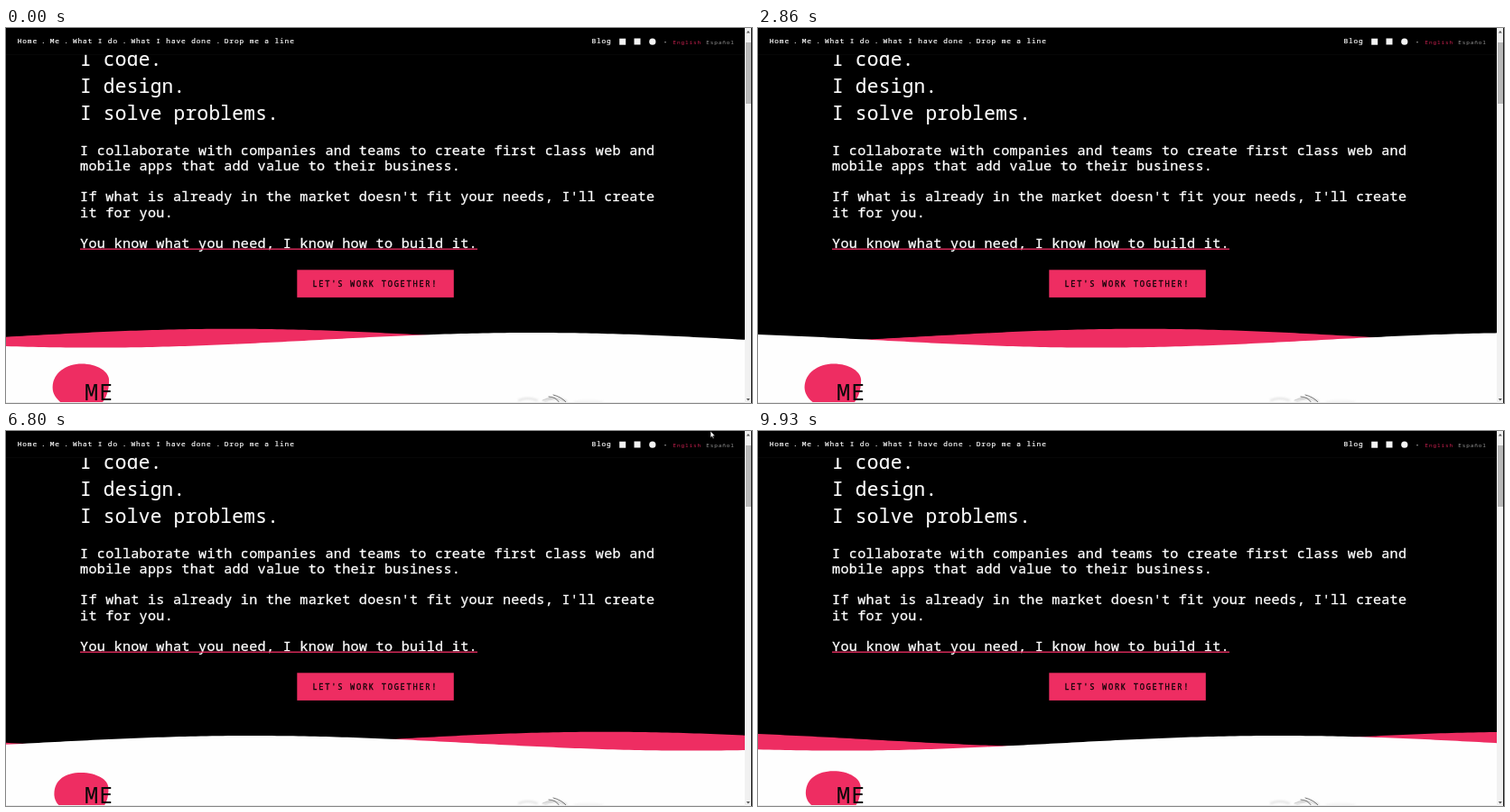
An HTML page for the animation above (10000 ms loop, 826 px wide and 416 px high).

```html
<!DOCTYPE html>
<html lang="en">
<head>
<meta charset="utf-8">
<title>Portfolio page</title>
<style>
html, body { margin: 0; width: 100%; height: 100%; overflow: hidden; background: #000; }
svg { display: block; width: 826px; height: 416px; }
text { font-family: "Noto Sans Mono", "Liberation Mono", monospace; fill: #fdfdfd; white-space: pre; }
.head { font-size: 21.1px; letter-spacing: .3px; stroke: #fdfdfd; stroke-width: .15px; }
.body { font-size: 15.1px; letter-spacing: .3px; stroke: #fdfdfd; stroke-width: .3px; }
.nav { font-size: 7.8px; letter-spacing: .89px; stroke: #fdfdfd; stroke-width: .2px; }
.lang { font-size: 6.1px; letter-spacing: .82px; }
.cta { font-size: 8.7px; letter-spacing: 1.73px; fill: #0c0306; stroke: #0c0306; stroke-width: .3px; }
.me { font-size: 25.2px; letter-spacing: 1.1px; fill: #0a0a0a; }
.pink { fill: #ee2d62; }
</style>
</head>
<body>
<svg viewBox="0 0 826 416" width="826" height="416">
  <defs>
    <filter id="soft" x="-30%" y="-80%" width="160%" height="260%"><feGaussianBlur stdDeviation="1.3"/></filter>
  </defs>
  <rect width="826" height="416" fill="#000"/>
  <g id="copy"></g>
  <rect x="82" y="244.6" width="440" height="1.3" class="pink"/>
  <rect x="322.3" y="268.3" width="173.5" height="30.6" class="pink"/>
  <text class="cta" x="339.4" y="287">LET'S WORK TOGETHER!</text>

  <path id="back" class="pink"/>
  <path id="front" fill="#fefefe"/>
  <path id="blob" class="pink"/>
  <text class="me" x="87" y="413">ME</text>

  <g fill="none" stroke-linecap="round">
    <g filter="url(#soft)" stroke="#888">
      <path d="M568 413q9-4 20 0" stroke-width="2" opacity=".25"/>
      <path d="M596 414q10-6 24 0" stroke-width="2" opacity=".4"/>
      <path d="M630 415q16-2 30 0" stroke-width="1.5" opacity=".15"/>
    </g>
    <path d="M601 409q8 0 12 7M606 407q9 2 15 9" stroke="#444" stroke-width=".9" opacity=".8"/>
    <path d="M594 413q5-3 11-2" stroke="#888" stroke-width=".6" opacity=".6"/>
  </g>
  <rect y="415" width="818" height="1" fill="#e9e9e9"/>

  <rect width="818" height="29.5" fill="#000"/>
  <rect y="29" width="818" height=".6" fill="#0c0c0c"/>
  <g id="menu"></g>
  <rect x="679.2" y="11.7" width="7" height="7" fill="#f4f4f4"/>
  <rect x="695.5" y="11.5" width="7" height="7" fill="#f4f4f4"/>
  <circle cx="715.8" cy="15.2" r="3.6" fill="#f4f4f4"/>
  <circle cx="730" cy="15.8" r=".8" fill="#aaa"/>
  <text class="lang" x="738.6" y="17.8" style="fill:#c9204f">English</text>
  <text class="lang" x="775.3" y="17.8" style="fill:#969696">Español</text>

  <rect x="818" width="7" height="416" fill="#f1f1f1"/>
  <rect x="819" y="16" width="6" height="68" fill="#b9b9b9"/>
  <path d="M819.8 5.4l2-2.4 2 2.4zM819.8 411l2 2.4 2-2.4z" fill="#555"/>
  <rect x="825" width="1" height="416" fill="#1a1a1a"/>
  <path id="cursor" d="M0 0V7.4L1.7 5.9 2.9 8.5 4 8 2.9 5.4H5.2Z" stroke-width=".6"/>
</svg>
<script>
const LOOP = 10000, STEP = 200 / 3, WIDTH = 818, PERIOD = 973;
const TAU = Math.PI * 2;
const $ = id => document.getElementById(id);

function addText(parent, cls, x, y, str) {
  const el = document.createElementNS("http://www.w3.org/2000/svg", "text");
  el.setAttribute("class", cls);
  el.setAttribute("x", x);
  el.setAttribute("y", y);
  el.textContent = str;
  $(parent).appendChild(el);
}

[["I code.", 41.5], ["I design.", 71.6], ["I solve problems.", 101.7]]
  .forEach(([s, y]) => addText("copy", "head", 81.9, y, s));

[["I collaborate with companies and teams to create first class web and", 140.8],
 ["mobile apps that add value to their business.", 158],
 ["If what is already in the market doesn't fit your needs, I'll create", 192.4],
 ["it for you.", 209.6],
 ["You know what you need, I know how to build it.", 244]]
  .forEach(([s, y]) => addText("copy", "body", 82.1, y, s));

[["Home", 12.7], [".", 39], ["Me", 48.8], [".", 64.3], ["What I do", 73.9], [".", 128.7],
 ["What I have done", 138.4], [".", 232.6], ["Drop me a line", 241.8], ["Blog", 648.4]]
  .forEach(([s, x]) => addText("menu", "nav", x, 17.3, s));

// Area under a cosine crest centred on `peak`
function wave(peak, top, amp) {
  let d = "M0 416";
  for (let x = 0; x <= WIDTH + 5; x += 6) {
    const px = Math.min(x, WIDTH);
    const y = top + amp * (1 - Math.cos(TAU * (px - peak) / PERIOD));
    d += `L${px} ${y.toFixed(2)}`;
  }
  return d + `L${WIDTH} 416Z`;
}

// k: 0 = tallest, 1 = lowest
function blob(k) {
  const top = 371.5 + 8 * k, left = 51.3 + 2.2 * k, right = 114.2 - .8 * k;
  const yl = 398 + 5 * k, yr = 390 + 7 * k, mid = 84 - k;
  return `M${left} ${yl}C${left} ${yl - 16} ${mid - 17} ${top} ${mid} ${top}` +
    `S${right} ${yr - 10} ${right} ${yr}` +
    `C${right} ${yr + 20} 104 424 88 424S${left} ${yl + 16} ${left} ${yl}Z`;
}

// time, x, y of the pointer tip
const track = [[5800, 823, 9], [6350, 780, 0], [7600, 780, 0], [8300, 783, 0], [8900, 783, 0], [9250, 787, -10]];
const HOVER = 8000;

function moveCursor(t) {
  const i = track.findIndex(p => p[0] > t), cursor = $("cursor");
  cursor.style.display = i > 0 ? "" : "none";
  if (i <= 0) return;
  const [a, b] = [track[i - 1], track[i]];
  let u = (t - a[0]) / (b[0] - a[0]);
  u = u * u * (3 - 2 * u);
  cursor.setAttribute("transform",
    `translate(${a[1] + (b[1] - a[1]) * u} ${a[2] + (b[2] - a[2]) * u})`);
  cursor.setAttribute("fill", t < HOVER ? "#fff" : "#000");
  cursor.setAttribute("stroke", t < HOVER ? "#000" : "#aaa");
}

function draw(t) {
  $("back").setAttribute("d", wave(250 + PERIOD * t / 16000, 333.7, 8.6));
  $("front").setAttribute("d", wave(584 + PERIOD * t / 10000, 338, 8.3));
  $("blob").setAttribute("d", blob((1 - Math.cos(TAU * (t - 1500) / 12400)) / 2));
  moveCursor(t);
}

const start = performance.now();
function tick() {
  const t = (performance.now() - start) % LOOP;
  draw(Math.min(149, Math.floor((t + 6.7) / STEP)) * STEP);
  requestAnimationFrame(tick);
}
tick();
</script>
</body>
</html>
```
